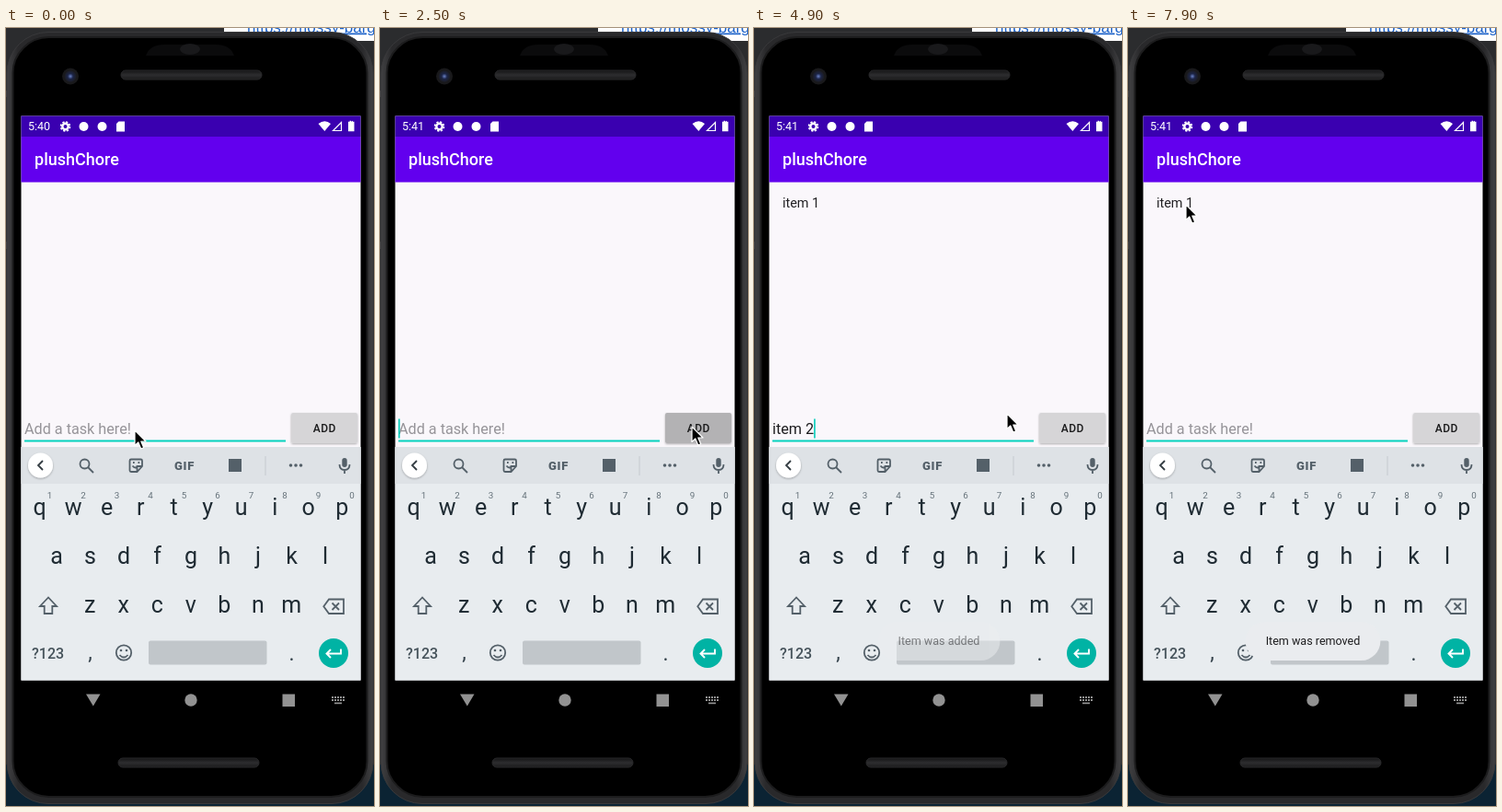
Write an HTML page that moves like this. It is 400 by 845 pixels and loops after 8 s.

```html
<!DOCTYPE html>
<html lang="en">
<head>
<meta charset="utf-8">
<style>
html, body { margin: 0; width: 100%; height: 100%; overflow: hidden; background: #1d1f21; }
svg { display: block; width: 400px; height: 845px; font-family: Roboto, "Open Sans", sans-serif; }
.mid { text-anchor: middle; }
.line { fill: none; stroke: #546069; stroke-width: 1.8; }
</style>
</head>
<body>
<svg viewBox="0 0 400 845">
  <defs>
    <linearGradient id="edge" x2="1" y2="0">
      <stop offset="0" stop-color="#414143"/><stop offset=".03" stop-color="#29292b"/>
      <stop offset=".97" stop-color="#29292b"/><stop offset="1" stop-color="#414143"/>
    </linearGradient>
    <linearGradient id="slot" x2="0" y2="1">
      <stop offset="0" stop-color="#141415"/><stop offset=".5" stop-color="#2d2d2f"/><stop offset="1" stop-color="#1b1b1c"/>
    </linearGradient>
    <radialGradient id="lens"><stop offset="0" stop-color="#6a80c4"/><stop offset=".45" stop-color="#1c2547"/><stop offset="1" stop-color="#1b1b20"/></radialGradient>
    <filter id="soft" x="-20%" y="-40%" width="140%" height="180%"><feDropShadow dx="0" dy="1" stdDeviation="1" flood-opacity=".3"/></filter>
  </defs>

  <!-- desktop and phone body -->
  <rect width="400" height="845" fill="#2b2c2e"/>
  <rect x="237" width="163" height="14" fill="#fff"/>
  <text x="262" y="4.500" font-size="17" fill="#1c62c9" text-decoration="underline" font-family="Liberation Sans, sans-serif">https://mossy-barge</text>
  <path d="M0 800h400v45H0z" fill="#0b2333"/>
  <path d="M0 68h5v7H0zM0 232h5v8H0z" fill="#4b4b4d"/>
  <rect x="1" y="4.500" width="398" height="838" rx="45" fill="url(#edge)" stroke="#39393b"/>
  <rect x="7.500" y="10" width="385" height="825" rx="39" fill="#000" stroke="#1c1c1d" stroke-width="2"/>
  <path d="M152 30q4-12 20-12h56q16 0 20 12z" fill="#0b0b0c"/>
  <ellipse cx="200" cy="23" rx="11" ry="6" fill="#19191b"/>
  <rect x="125" y="46" width="153" height="10" rx="5" fill="url(#slot)" stroke="#29292b"/>
  <rect x="122" y="793" width="153" height="10" rx="5" fill="url(#slot)" stroke="#29292b"/>
  <circle cx="70" cy="52.500" r="9" fill="#19191b"/><circle cx="70" cy="52.500" r="6.500" fill="url(#lens)"/>

  <!-- app -->
  <rect x="16.500" y="95.500" width="369" height="613" fill="#faf7fb"/>
  <rect x="16.500" y="118" width="369" height="49.500" fill="#6200ee"/>
  <rect x="16.500" y="95.500" width="369" height="22.500" fill="#3a00b0"/>
  <g fill="#fff">
    <text id="clock" x="24" y="111.300" font-size="12.500"></text>
    <circle cx="64.500" cy="107" r="3.200" fill="none" stroke="#fff" stroke-width="2.400"/>
    <circle cx="64.500" cy="107" r="4.900" fill="none" stroke="#fff" stroke-width="1.700" stroke-dasharray="2.200 1.650"/>
    <circle cx="84.500" cy="107" r="5"/>
    <circle cx="104.500" cy="107" r="5"/>
    <path d="M122.500 101.500h6.500v11h-9v-8.500z"/>
    <path d="M339.500 104q7-5.500 13.500 0l-6.700 8zM375 101.800v-1h-1.400v1H372v10.400h6.500v-10.400h-1.600v-1z"/>
    <path d="M355.500 111.500h9v-9z" fill="none" stroke="#fff" stroke-width="1.200"/>
    <text x="31" y="149" font-size="18" font-weight="500">plushChore</text>
  </g>
  <g font-size="14.400" fill="#212023">
    <text id="item1" x="31" y="194.500">item 1</text><text id="item2" x="31" y="237.500">item 2</text>
  </g>
  <text id="entry" x="20" y="441" font-size="16.200" style="white-space:pre"></text>
  <path id="compose" stroke="#222"/>
  <rect id="caret" y="424.500" width="1.600" height="21" fill="#03cdb9"/>
  <path d="M20 448.500h284" stroke="#06d2be" stroke-width="2"/>
  <rect id="button" x="310" y="418" width="72" height="33" rx="2" filter="url(#soft)"/>
  <text x="346.300" y="438.700" class="mid" font-size="12" font-weight="500" letter-spacing=".5" fill="#1b1b1c">ADD</text>

  <!-- keyboard -->
  <rect x="16.500" y="455" width="369" height="253.500" fill="#e8ecef"/>
  <rect x="16.500" y="455" width="369" height="40" fill="#dee2e6"/>
  <circle cx="37.500" cy="475" r="13.500" fill="#fff" filter="url(#soft)"/>
  <path id="chevron" fill="none" stroke="#333c42" stroke-width="1.800"/>
  <g id="tools">
    <circle cx="85.500" cy="473.500" r="5" class="line"/><path d="M89 477l6 6" class="line"/>
    <path d="M136 468.500h10.500q1.500 0 1.500 1.500v6l-5.500 6H136q-1.500 0-1.500-1.500V470q0-1.500 1.500-1.500zM148 476h-5.500v6M137.500 475.500q3 4 6 0" class="line"/>
    <path d="M138 472h1.700M143.500 472h1.700" class="line"/>
    <text x="194" y="479.500" class="mid" font-size="13" font-weight="900" letter-spacing=".7" fill="#546069">GIF</text>
    <rect x="242" y="468" width="14" height="14" fill="#546069"/>
    <path d="M282 465v21" stroke="#c5cacf"/>
    <g fill="#546069"><circle cx="309.500" cy="475" r="1.800"/><circle cx="315" cy="475" r="1.800"/><circle cx="320.500" cy="475" r="1.800"/></g>
  </g>
  <g id="words" font-size="15.500" fill="#58646b" class="mid">
    <path d="M146 464v22M254 464v22" stroke="#c5cacf"/>
    <text x="98" y="481.500"></text>
    <text x="200" y="481.500" font-weight="700" fill="#1d272d"></text>
    <text x="302" y="481.500"></text>
  </g>
  <rect x="365.300" y="467" width="5.400" height="10" rx="2.700" fill="#546069"/>
  <path d="M362.500 474q0 6 5.500 6t5.500-6M368 480v4" class="line"/>
  <g id="keys" class="mid"></g>
  <path d="M46 618.500l-9 9.500h4.700v8h8.600v-8H55z" class="line"/>
  <path d="M351 620.500h16v15.500h-16l-5.700-7.700zM354.500 624.500l7.500 7.500M362 624.500l-7.500 7.500" class="line"/>
  <text x="28" y="684.500" font-size="16" font-weight="500" fill="#46535b">?123</text>
  <g font-size="23" fill="#33414a" class="mid"><text x="91.500" y="686">,</text><text x="310.500" y="687">.</text></g>
  <circle cx="128" cy="678.500" r="8.200" class="line"/>
  <path d="M123.500 681q4.500 5 9 0" class="line"/>
  <g fill="#546069"><circle cx="125" cy="676" r="1.300"/><circle cx="131" cy="676" r="1.300"/></g>
  <rect x="155" y="665.500" width="128.500" height="26" rx="2" fill="#c1c6ca"/>
  <circle cx="356" cy="679" r="16" fill="#00b3a4"/>
  <path d="M364 674.500v5h-15M353 675l-4.500 4.500 4.500 4.500" fill="none" stroke="#fff" stroke-width="1.900"/>

  <g id="toast">
    <rect y="645" height="42" rx="21" fill="#eaecef"/>
    <text x="201" y="670" class="mid" font-size="12.550" fill="#1d1d1f"></text>
  </g>

  <!-- navigation bar -->
  <g fill="#929292">
    <path d="M87 723.500h15.500l-7.700 13z"/><circle cx="201" cy="730" r="6.700"/><rect x="300.500" y="723.500" width="13.500" height="13.500"/>
    <path d="M354 727h14M354 730h14" fill="none" stroke="#929292" stroke-width="2" stroke-dasharray="2 1"/><path d="M357 732.500h8v1.700h-8z"/>
  </g>
  <path id="mouse" d="M0 0v16.500l3.800-3.500 2.900 7 3-1.200-2.900-6.800H12z" fill="#000" stroke="#fff" stroke-width="1.200" stroke-linejoin="round"/>
</svg>
<script>
const $ = id => document.getElementById(id);
const LOOP = 8000;
const wordTexts = $('words').querySelectorAll('text');
const [toastBox, toastText] = $('toast').children;

// Letter rows: letters, first key centre, baseline.
const key = (x, y, size, label, fill = '#1f2b33') =>
  `<text x="${x}" y="${y}" font-size="${size}" fill="${fill}">${label}</text>`;
$('keys').innerHTML = [['qwertyuiop', 36.7, 529], ['asdfghjkl', 55, 582], ['zxcvbnm', 91.3, 635]]
  .map(([row, x0, y], r) => [...row].map((c, i) => {
    const x = x0 + i * 36.5;
    return key(x, y, 25, c) + (r ? '' : key(x + 10.7, 511, 9.8, (i + 1) % 10, '#65727a'));
  }).join('')).join('');

// Text field contents from each moment on.
const typing = [
  [-500, ''], [550, 'i'], [680, 'it'], [800, 'ite'], [930, 'item'], [1080, 'item '], [1280, 'item 1'],
  [2420, ''], [3750, 'i'], [3920, 'it'], [4050, 'ite'], [4180, 'item'], [4330, 'item '], [4550, 'item 2'],
  [5400, '']
];
const suggestions = {
  i: ['i', 'I', "I'm"], it: ['it', 'It', "it's"], ite: ['ite', 'item', 'items'],
  item: ['Item', 'item', 'items'], 'item ': ['is', 'and', 'in']
};
const moves = [
  [0, 140, 437], [1600, 140, 437], [2200, 339, 433], [2750, 339, 433], [3400, 132, 430],
  [4600, 132, 430], [4900, 275, 419], [5150, 339, 433], [5450, 339, 433], [5700, 213, 396],
  [6150, 63, 234], [7150, 63, 234], [7500, 63, 192], [LOOP, 63, 192]
];
const toasts = [[2650, 5050, 'Item was added'], [5540, 7600, 'Item was added'], [7600, 9900, 'Item was removed']];

const clamp = v => Math.max(0, Math.min(1, v));
const show = (el, on) => el.setAttribute('visibility', on ? 'visible' : 'hidden');
const within = (t, a, b) => t >= a && t < b;

function mouseAt(t) {
  const i = moves.findIndex(m => m[0] > t);
  const [t0, x0, y0] = moves[i - 1], [t1, x1, y1] = moves[i];
  const u = (t - t0) / (t1 - t0), k = u * u * (3 - 2 * u);
  return [x0 + (x1 - x0) * k, y0 + (y1 - y0) * k];
}

function drawField(t) {
  const [since, text] = typing.filter(e => e[0] <= t).pop();
  const entry = $('entry');
  entry.textContent = text || 'Add a task here!';
  entry.setAttribute('fill', text ? '#1d1d1f' : '#969499');
  const width = text ? entry.getComputedTextLength() : 0;
  $('caret').setAttribute('x', 20 + width);
  show($('caret'), Math.floor((t - since) / 500) % 2 === 0);
  const words = suggestions[text];
  show($('compose'), words && !text.endsWith(' '));
  $('compose').setAttribute('d', `M20.5 443.5h${width}`);
  show($('words'), words);
  show($('tools'), !words);
  $('chevron').setAttribute('d', words ? 'M35 470l5 5-5 5' : 'M40 470l-5 5 5 5');
  if (words) wordTexts.forEach((el, i) => el.textContent = words[i]);
}

function drawToast(t) {
  const active = toasts.find(([a, b]) => within(t, a, b));
  show($('toast'), active);
  if (!active) return;
  const [start, end, label] = active;
  toastText.textContent = label;
  const width = toastText.getComputedTextLength() + 44;
  toastBox.setAttribute('x', 201 - width / 2);
  toastBox.setAttribute('width', width);
  $('toast').setAttribute('opacity', Math.min(clamp((t - start) / 220), clamp((end - t) / 300)));
}

function draw(t) {
  $('clock').textContent = t < 2000 ? '5:40' : '5:41';
  show($('item1'), t >= 2600);
  show($('item2'), within(t, 5500, 6950));
  const pressed = within(t, 2330, 2650) || within(t, 5300, 5520);
  $('button').setAttribute('fill', pressed ? '#b3b2b4' : '#d6d5d7');
  drawField(t);
  drawToast(t);
  $('mouse').setAttribute('transform', `translate(${mouseAt(t)})`);
}

function tick() {
  draw(performance.now() % LOOP);
  requestAnimationFrame(tick);
}
tick();
</script>
</body>
</html>
```
